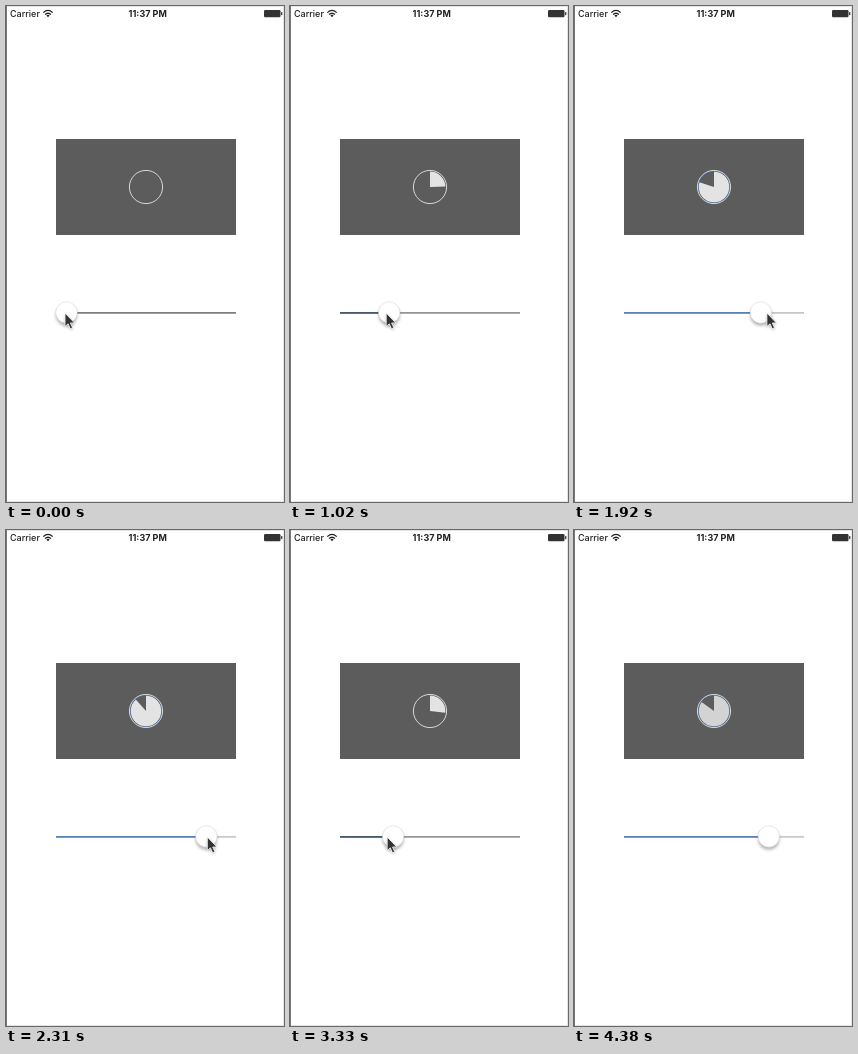
An HTML page for the animation above (6150 ms loop, 278 by 496 pixels).

```html
<!DOCTYPE html>
<html lang="en">
<head>
<meta charset="utf-8">
<title>Slider and pie progress</title>
<style>
html, body { margin: 0; width: 100%; height: 100%; overflow: hidden; background: #fff; }
svg { display: block; width: 100%; height: 100%; }
text { font: 500 9px Inter, Roboto, sans-serif; fill: #222; }
.clock { font-weight: 700; text-anchor: middle; }
</style>
</head>
<body>
<svg viewBox="0 0 278 496">
  <defs>
    <filter id="soft" x="-50%" y="-50%" width="200%" height="200%"><feGaussianBlur stdDeviation="1.8"/></filter>
  </defs>
  <rect width="278" height="496" fill="#fff"/>
  <path d="M0 .5H278M277.5 0V496M0 495.5H278" stroke="#e4e4e4"/>
  <path d="M.5 0V496" stroke="#777"/>

  <text x="4" y="10.8">Carrier</text>
  <g fill="none" stroke="#222" stroke-width="1.3">
    <path d="M37.3 6.6Q42 2.2 46.7 6.6M39 8.6Q42 5.8 45 8.6"/>
    <path d="M40.4 9.4Q42 8.2 43.6 9.4L42 11.2Z" fill="#222" stroke="none"/>
  </g>
  <text class="clock" x="141.7" y="10.8">11:37 PM</text>
  <rect x="258" y="4" width="16.5" height="7.3" rx="1.2" fill="#333"/>
  <rect x="275" y="6" width="1.4" height="3.2" rx=".6" fill="#444"/>

  <rect x="50" y="133" width="180" height="96" fill="#5c5c5c"/>
  <g fill="none" transform="rotate(-90 140 181)">
    <circle id="pie" cx="140" cy="181" r="7.7" stroke-width="15.4" pathLength="1"/>
    <circle id="edge" cx="140" cy="181" r="15.9" stroke="#3d73b5" stroke-width=".8"/>
    <circle cx="140" cy="181" r="16.6" stroke="#e6e6e6" stroke-width=".9"/>
  </g>

  <rect id="rest" x="50" y="306.2" width="180" height="1.4"/>
  <rect id="done" x="50" y="306.2" height="1.4"/>
  <g id="thumb">
    <circle cy="2.5" r="10.8" fill="#000" opacity=".28" filter="url(#soft)"/>
    <circle r="10.7" fill="#fff" stroke="#d2d2d2" stroke-width=".5"/>
  </g>
  <g id="cursor">
    <path d="M0 1V15L3.3 12L5.6 17L8 16L5.8 11H10Z" opacity=".3" filter="url(#soft)"/>
    <path d="M0 0V13.6L3.1 10.8L5.3 15.8L7.6 14.8L5.4 10H9.6Z" fill="#303236" stroke="#fff" stroke-width=".8"/>
  </g>
</svg>
<script>
const LOOP = 6150, STEP = 30;

// [time in ms, value]
const progress = [[0, 0], [540, 0], [1020, .245], [1920, .8], [2310, .885], [2580, .875],
  [2760, .725], [3330, .27], [3360, .27], [3840, .75], [4080, .85], [LOOP, .85]];
const pointerLead = [[0, -1.5], [540, -1.5], [1020, -3], [1920, 6], [2310, 1], [2580, 0],
  [2760, -2.5], [3330, -6], [3360, -6], [3840, 8], [4080, 4], [LOOP, 4]];

// Smooth curve through the keys that never overshoots them.
function sample(keys, t) {
  const slope = i => (keys[i + 1][1] - keys[i][1]) / (keys[i + 1][0] - keys[i][0]);
  const tangent = i => {
    if (i === 0 || i === keys.length - 1) return 0;
    const a = slope(i - 1), b = slope(i);
    return a * b > 0 ? 2 * a * b / (a + b) : 0;
  };
  let i = 0;
  while (i < keys.length - 2 && t >= keys[i + 1][0]) i++;
  const [t0, v0] = keys[i], [t1, v1] = keys[i + 1];
  const d = t1 - t0, u = (t - t0) / d, w = 1 - u;
  return v0 * (1 + 2 * u) * w * w + v1 * u * u * (3 - 2 * u)
    + d * (tangent(i) * u * w * w - tangent(i + 1) * u * u * w);
}

const clamp = x => Math.max(0, Math.min(1, x));
const mix = (from, to, k) => `rgb(${from.map((c, i) => Math.round(c + (to[i] - c) * k))})`;
const byId = id => document.getElementById(id);
const set = (id, attrs) => {
  for (const name in attrs) byId(id).setAttribute(name, attrs[name]);
};

function draw(t) {
  const value = sample(progress, t);
  const x = 60.5 + 158 * value;
  const tint = clamp((value - .2) / .6);
  const fade = 1 - clamp((t - 4200) / 180);

  set('pie', { 'stroke-dasharray': `${value} 2`, stroke: t < 4380 ? '#e3e3e3' : '#d3d3d3' });
  set('edge', { opacity: .75 * tint });
  set('rest', { fill: mix([96, 96, 96], [188, 188, 188], clamp(value / .85)) });
  set('done', { width: x - 50, fill: mix([52, 70, 92], [66, 115, 180], tint) });
  set('thumb', { transform: `translate(${x} 306.5)` });
  set('cursor', { transform: `translate(${x + sample(pointerLead, t)} 307)`, opacity: fade });
}

function tick(now) {
  draw(Math.floor(now % LOOP / STEP) * STEP);
  requestAnimationFrame(tick);
}
draw(0);
requestAnimationFrame(tick);
</script>
</body>
</html>
```
